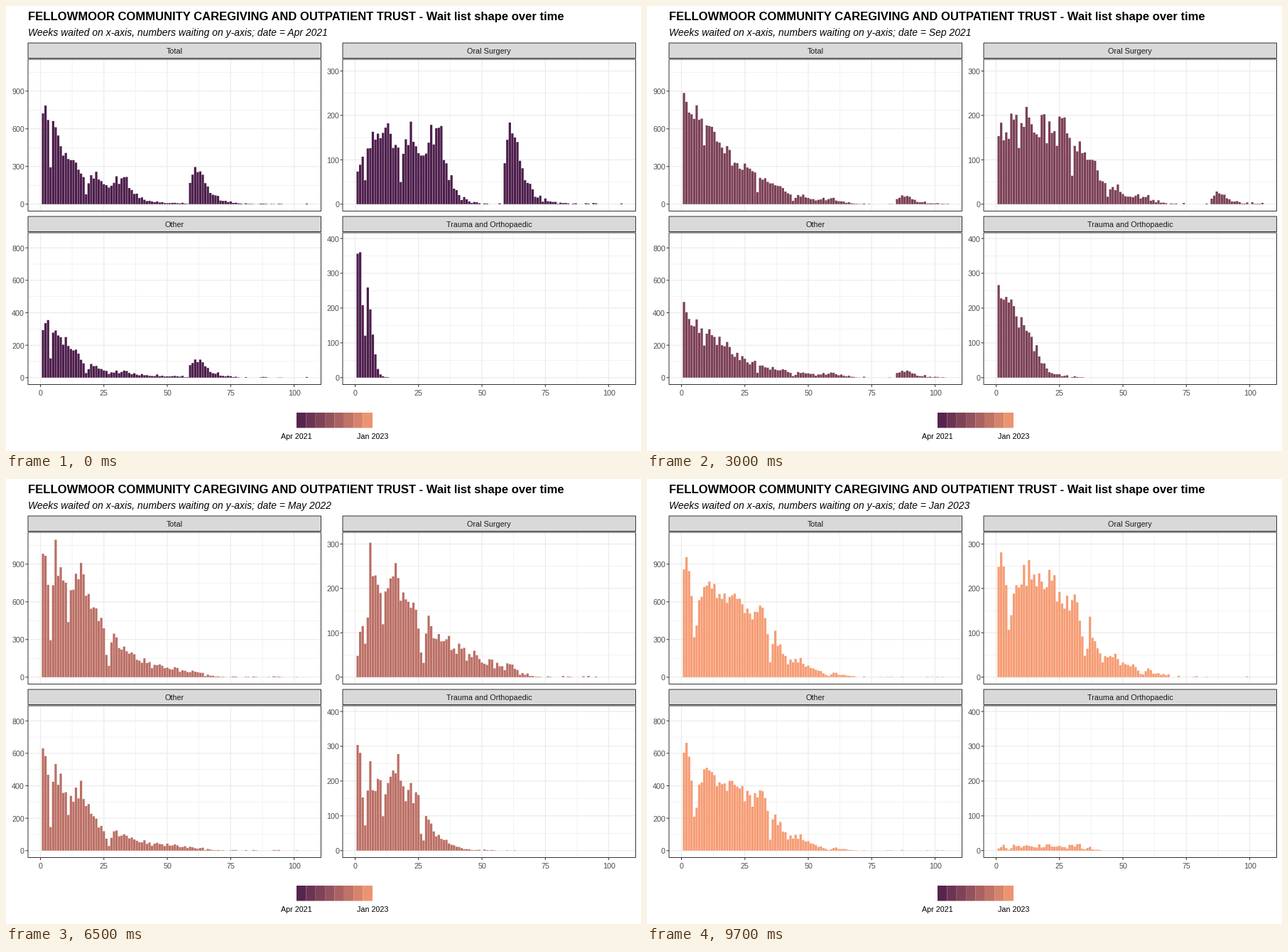
A matplotlib script for the animation above (10000 ms loop, 894x626 px).

```python
import numpy as np
import matplotlib.pyplot as plt
from matplotlib.animation import FuncAnimation
from matplotlib.collections import PolyCollection
from matplotlib.colors import LinearSegmentedColormap
from matplotlib.patches import Rectangle

W, H, DPI = 894, 626, 100
FRAMES, INTERVAL = 100, 100
plt.rcParams["font.family"] = "Liberation Sans"

TITLE = "FELLOWMOOR COMMUNITY CAREGIVING AND OUTPATIENT TRUST - Wait list shape over time"
SUBTITLE = "Weeks waited on x-axis, numbers waiting on y-axis; date = "
NAMES = "Jan Feb Mar Apr May Jun Jul Aug Sep Oct Nov Dec".split()
SHADES = LinearSegmentedColormap.from_list("shades", ["#4C1D4B", "#9E595E", "#F69C73"])

WEEKS = np.arange(1, 106)
WEEKS_PER_MONTH = 4.37
OLDEST = 110

# Months count from April 2021; one has no figures, one repeats its predecessor's bars.
BAR_MONTHS = [m for m in range(22) if m not in (8, 15)]
BAR_STARTS = dict(zip(BAR_MONTHS, [5 * k for k in range(14)] + [75, 80, 84, 88, 92, 96]))
# The date follows one frame after the bars.
DATE_STARTS = {m: s + 1 for m, s in BAR_STARTS.items()} | {0: 0, 15: 71}

# Holiday dips and busy spells in referrals: calendar week, depth, width.
SPELLS = [(-33, -0.4, 2.5), (-27, 0.4, 2.5), (-18, 0.7, 1), (-4, 0.55, 0.7),
          (17, 0.3, 0.8), (34.3, 0.8, 1), (45, -0.3, 2.5), (50, 0.5, 0.7),
          (55, -0.3, 0.7), (57, 0.6, 0.7), (60.5, -0.3, 1.5), (86.7, 0.65, 1)]
KEY_MONTHS = [0, 2, 6, 12, 14, 18, 21]


class Clinic:
    """A waiting list whose patients move along the axis as they wait.

    level, half and power set the fall-off with age, young the excess of new patients;
    each has one value per key month.
    """

    def __init__(self, seed, level, half, power, young, backlog=0, fade=1, dust=0):
        self.keys = level, half, power, young
        self.backlog, self.fade, self.dust = backlog, fade, dust
        rng = np.random.default_rng(seed)
        size = 2 * OLDEST
        self.noise = np.clip(rng.normal(size=size), -1.8, 1.8)
        self.stray = rng.random(size) * (rng.random(size) < 0.3)

    def counts(self, month):
        level, half, power, young = (np.interp(month, KEY_MONTHS, k) for k in self.keys)
        now = round(WEEKS_PER_MONTH * month)
        joined = now - WEEKS
        v = level / (1 + (WEEKS / half) ** power) / (1 + np.exp((WEEKS - 66) / 2))
        v *= np.maximum(1 + young * np.exp(-WEEKS / 3), 0.08)
        for week, depth, width in SPELLS:
            v *= 1 - depth * np.exp(-((joined - week) / width) ** 2)
        early = np.maximum(-58 - joined, 0) / 3
        v += self.backlog * np.exp(-now / self.fade) * early * np.exp(1 - early)
        v += self.noise[joined + OLDEST] * (0.07 * v + 0.7 * np.sqrt(v))
        v += self.dust * self.stray[joined + OLDEST]
        return np.where(v > 0.8, v, 0)


CLINICS = [
    Clinic(3, level=(160, 205, 180, 235, 235, 165, 225), half=(36, 25, 38, 26, 28, 37, 33),
           power=(14, 3.7, 6, 2.5, 2.8, 9, 4.5), young=(-0.9, -0.8, -0.3, -1.4, -1.2, -1.2, 0.1),
           backlog=160, fade=13, dust=3),
    Clinic(8, level=(300, 320, 320, 390, 430, 470, 420), half=(14.5, 16, 20, 19, 20, 30.5, 35),
           power=(2.9, 3, 2.6, 2.5, 2.7, 7, 6), young=(0.2, 0.05, 0.5, 0.3, 0.1, 0.9, 0.7),
           backlog=110, fade=28, dust=5),
    Clinic(5, level=(200, 200, 205, 200, 190, 9, 12), half=(7.3, 11, 14.5, 23, 28, 33, 38),
           power=(9, 16, 6, 7, 8, 30, 30), young=(1, 0.55, 0.1, 0.1, 0.2, 0.3, 0)),
]


def month_bars(month):
    parts = [c.counts(month) for c in CLINICS]
    return [sum(parts), *parts]


DATA = {m: month_bars(m) for m in BAR_MONTHS}

fig = plt.figure(figsize=(W / DPI, H / DPI), dpi=DPI, facecolor="white")
ax = fig.add_axes([0, 0, 1, 1])
ax.set_xlim(0, W)
ax.set_ylim(H, 0)
ax.axis("off")


def px(size):
    return size * 72 / DPI


def write(x, y, s, size=10.8, color="black", ha="center", va="center_baseline", **kw):
    return ax.text(x, y, s, fontsize=px(size), color=color, ha=ha, va=va, **kw)


def line(xs, ys, color, width, z):
    ax.plot(xs, ys, color=color, lw=px(width), zorder=z, solid_capstyle="butt", snap=False)


def box(x, y, w, h, face, edge="none", z=1):
    ax.add_patch(Rectangle((x, y), w, h, fc=face, ec=edge, lw=px(1), zorder=z, snap=False))


class Panel:
    WIDTH, WEEK = 412.5, 3.571

    def __init__(self, name, left, top, scale, step, high, bottom_axis):
        self.x0, self.zero, self.scale = left + 17.5, top + 226.8, scale
        right, y1, y2 = left + self.WIDTH, top + 23, top + 236.5
        box(left, top, self.WIDTH, 21.5, "#D9D9D9", "#333333")
        write(left + self.WIDTH / 2, top + 11.4, name, color="#1A1A1A")
        for k in range(9):
            x = self.x0 + 12.5 * k * self.WEEK
            line([x, x], [y1, y2], "#EBEBEB", 0.6 if k % 2 else 1.2, 1)
            if bottom_axis and k % 2 == 0:
                line([x, x], [y2, y2 + 3.5], "#333333", 1, 3)
                write(x, y2 + 11.5, f"{12.5 * k:.0f}", color="#4D4D4D")
        half = step // 2
        for v in range(0, high + 1, half):
            y = self.zero - v * scale
            major = v % step == 0
            line([left, right], [y, y], "#EBEBEB", 1.2 if major else 0.6, 1)
            if major:
                line([left - 3.5, left], [y, y], "#333333", 1, 3)
                write(left - 5, y + 0.5, str(v), color="#4D4D4D", ha="right")
        box(left, y1, self.WIDTH, y2 - y1, "none", "#333333", z=4)
        self.bars = PolyCollection([], linewidths=0, zorder=2, snap=False)
        ax.add_collection(self.bars, autolim=False)

    def show(self, values, color):
        half = 0.45 * self.WEEK
        verts = []
        for week, v in zip(WEEKS, values):
            if v > 0:
                x, y = self.x0 + week * self.WEEK, self.zero - v * self.scale
                verts.append([(x - half, self.zero), (x - half, y),
                              (x + half, y), (x + half, self.zero)])
        self.bars.set_verts(verts)
        self.bars.set_facecolor(color)


panels = [
    Panel("Total", 31, 52, 0.1767, 300, 1050, False),
    Panel("Oral Surgery", 474, 52, 0.6245, 100, 300, False),
    Panel("Other", 31, 296, 0.2282, 200, 800, True),
    Panel("Trauma and Orthopaedic", 474, 296, 0.4895, 100, 400, True),
]

write(31, 20, TITLE, 16.6, ha="left", va="baseline", weight="bold")
subtitle = write(31, 42, "", 13.88, ha="left", va="baseline", style="italic")

cell = 107 / 8
for k in range(8):
    box(409 + k * cell, 572, cell, 21.5, SHADES((k + 0.5) / 8))
write(409, 604.8, "Apr 2021")
write(516, 604.8, "Jan 2023")


def current(starts, i):
    return max(m for m, s in starts.items() if s <= i)


def draw(i):
    month = current(BAR_STARTS, i)
    for panel, values in zip(panels, DATA[month]):
        panel.show(values, SHADES(month / 21))
    n = current(DATE_STARTS, i) + 3
    subtitle.set_text(f"{SUBTITLE}{NAMES[n % 12]} {2021 + n // 12}")
    return [p.bars for p in panels] + [subtitle]


anim = FuncAnimation(fig, draw, frames=FRAMES, interval=INTERVAL, repeat=True, repeat_delay=0)
plt.show()
```
